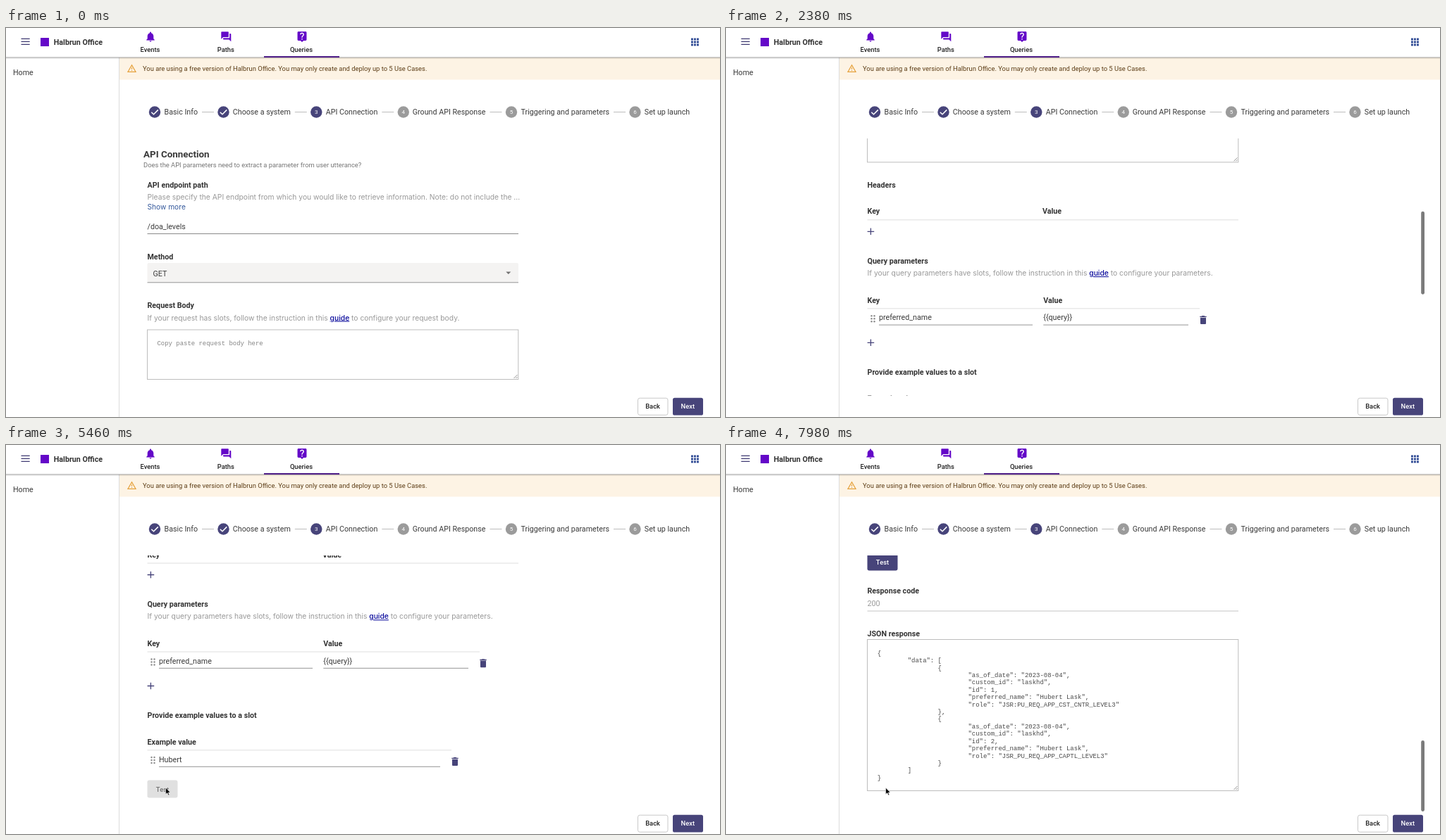
Write an HTML page that moves like this. It is 1013x553 px and loops after 8000 ms.

```html
<!DOCTYPE html>
<html lang="en">
<head>
<meta charset="utf-8">
<title>API Connection</title>
<style>
html, body { margin: 0; width: 100%; height: 100%; overflow: hidden; background: #fff; }
svg { display: block; width: 1013px; height: 553px; }
text { font: 10.7px Roboto, sans-serif; fill: #3a3a3a; white-space: pre; }
.head { font-size: 13.4px; font-weight: 700; fill: #3a3a3a; }
.bold { font-weight: 700; fill: #333; }
.small { font-size: 9.37px; fill: #757575; }
.tab { font-size: 9.37px; font-weight: 500; text-anchor: middle; fill: #222; }
.num { font-size: 8px; fill: #fff; text-anchor: middle; }
.banner { font-size: 9.37px; fill: #5c3d16; }
.desc { font: 10.3px Inter, sans-serif; fill: #999; }
.more { font: 10.2px Inter, sans-serif; fill: #35599c; }
.link { fill: #0a0a9c; font-weight: 500; text-decoration: underline; }
.mono { font: 8.95px "Liberation Mono", monospace; fill: #4a4a4a; }
.hint { fill: #858585; }
.value { fill: #999; }
</style>
</head>
<body>
<svg id="stage" viewBox="0 0 1013 553"></svg>
<script>
const INK = '#47447a', PURPLE = '#6408c8', GRAY = '#9b9b9b';
const ICONS = {
  bell: 'M18 11c0-3.07-1.64-5.64-4.5-6.32V4c0-.83-.67-1.5-1.5-1.5s-1.5.67-1.5 1.5v.68C7.63 5.36 6 7.92 6 11v5l-2 2v1h16v-1l-2-2v-5zm-6 11c1.1 0 2-.9 2-2h-4c0 1.1.9 2 2 2z',
  chat: 'M21 6h-2v9H6v2c0 .55.45 1 1 1h11l4 4V7c0-.55-.45-1-1-1zm-4 6V3c0-.55-.45-1-1-1H3c-.55 0-1 .45-1 1v14l4-4h10c.55 0 1-.45 1-1z',
  help: 'M19 2H5c-1.11 0-2 .9-2 2v14c0 1.1.89 2 2 2h4l3 3 3-3h4c1.1 0 2-.9 2-2V4c0-1.1-.9-2-2-2zm-6 16h-2v-2h2v2zm2.07-7.75-.9.92C13.45 11.9 13 12.5 13 14h-2v-.5c0-1.1.45-2.1 1.17-2.83l1.24-1.26c.37-.36.59-.86.59-1.41 0-1.1-.9-2-2-2s-2 .9-2 2H8c0-2.21 1.79-4 4-4s4 1.79 4 4c0 .88-.36 1.68-.93 2.25z',
  trash: 'M6 19c0 1.1.9 2 2 2h8c1.1 0 2-.9 2-2V7H6v12zM19 4h-3.5l-1-1h-5l-1 1H5v2h14V4z',
  warn: 'M12 5.99 19.53 19H4.47L12 5.99M12 2 1 21h22L12 2zm1 14h-2v2h2v-2zm0-6h-2v4h2v-4z'
};

const text = (x, y, str, cls = '') => `<text x="${x}" y="${y}" class="${cls}">${str}</text>`;
const rect = (x, y, w, h, attrs) => `<rect x="${x}" y="${y}" width="${w}" height="${h}" ${attrs}/>`;
const path = (d, color, width = 1, extra = '') =>
  `<path d="${d}" fill="none" stroke="${color}" stroke-width="${width}" ${extra}/>`;
const line = (x1, x2, y, color = '#949494', extra = '') => path(`M${x1} ${y}H${x2}`, color, 1, extra);
const icon = (name, cx, cy, k, color) =>
  `<path d="${ICONS[name]}" fill="${color}" transform="translate(${cx - 12 * k} ${cy - 12 * k}) scale(${k})"/>`;
const plus = y => path(`M200.6 ${y}h9.6m-4.8-4.8v9.6`, INK, 1.3);
const trash = (x, y) => icon('trash', x, y, .669, INK);
const grip = y => [-4, 0, 4].map(d => [206.5, 210.5].map(x =>
  `<circle cx="${x}" cy="${y + d}" r="1.2" fill="#8c8c8c"/>`).join('')).join('');
const area = (y, h) => rect(200.5, y, 526.3, h, 'fill="#fff" stroke="#bdbdbd"') +
  path(`M720.5 ${y + h - 1.5}l5-5m-2 5l2-2`, '#777', .8);
const guide = (y, before, after) =>
  text(200.5, y, `${before} <tspan class="link">guide</tspan> ${after}`, 'desc');

function step([cx, label, x], i) {
  const mark = i < 2
    ? path(`M${cx - 4.7} 119.7l3.2 3.1 6.3-6.4`, '#fff', 1.5)
    : text(cx, 122.4, i + 1, 'num');
  return `<circle cx="${cx}" cy="119.5" r="8.2" fill="${i < 3 ? INK : GRAY}"/>` + mark +
    text(x, 123.3, label) + (i ? line(cx - 30.5, cx - 13.5, 119.5, '#bdbdbd') : '');
}

const record = (id, role) =>
  `\t\t{\n\t\t\t"as_of_date": "2023-08-04",\n\t\t\t"custom_id": "laskhd",\n\t\t\t"id": ${id},\n` +
  `\t\t\t"preferred_name": "Hubert Lask",\n\t\t\t"role": "${role}"\n\t\t}`;
const json = `{\n\t"data": [\n${record(1, 'JSR:PU_REQ_APP_CST_CNTR_LEVEL3')},\n` +
  `${record(2, 'JSR_PU_REQ_APP_CAPTL_LEVEL3')}\n\t]\n}`;
const jsonLines = json.split('\n').map((row, i) => {
  const tabs = row.lastIndexOf('\t') + 1;
  return text(214.8 + tabs * 42.9, 1035.3 + i * 10.41, row.slice(tabs), 'mono');
}).join('');

const form = [
  text(195, 184.2, 'API Connection', 'head'),
  text(195, 198, 'Does the API parameters need to extract a parameter from user utterance?', 'small'),
  text(200.5, 227, 'API endpoint path', 'bold'),
  text(200.5, 244.2, 'Please specify the API endpoint from which you would like to retrieve information. Note: do not include the ...', 'desc'),
  text(200.5, 258, 'Show more', 'more'),
  text(200.5, 285.8, '/doa_levels'),
  line(200.5, 727, 292.5, '#8a8a8a'),
  text(200.5, 329, 'Method', 'bold'),
  rect(200.5, 334, 526.5, 28, 'rx="2" fill="#f4f3f2"'),
  line(200.5, 727, 361.8, '#949494'),
  text(208.5, 353.4, 'GET'),
  '<path d="M709.3 346.5h7l-3.5 3.5z" fill="#707070"/>',
  text(200.5, 398, 'Request Body', 'bold'),
  guide(415.5, 'If your request has slots, follow the instruction in this', 'to configure your request body.'),
  area(429, 70.5),
  text(214.5, 451, 'Copy paste request body here', 'mono hint'),

  text(200.5, 535.5, 'Headers', 'bold'),
  text(200.5, 573, 'Key', 'bold'), text(449, 573, 'Value', 'bold'),
  line(200.5, 727, 581.5, '#dedede'),
  plus(598),
  text(200.5, 643.5, 'Query parameters', 'bold'),
  guide(660.8, 'If your query parameters have slots, follow the instruction in this', 'to configure your parameters.'),
  text(200.5, 699.3, 'Key', 'bold'), text(450.3, 699.3, 'Value', 'bold'),
  line(200.5, 672, 707.5, '#dedede'),
  grip(722), text(217, 724.2, 'preferred_name'), text(450.3, 724.2, '{{query}}'),
  line(217, 435, 730.8), line(450.3, 656, 730.8), trash(677, 723.7),
  plus(756),

  text(200.5, 801.5, 'Provide example values to a slot', 'bold'),
  text(200.5, 839, 'Example value', 'bold'),
  line(200.5, 632, 847.3, '#dedede'),
  grip(861.5), text(217, 864, 'Hubert'),
  line(217, 616, 870.8), trash(637, 863.5),
  rect(200.5, 890, 43, 25, 'rx="2.7" id="test"'),
  '<text x="222" y="906" class="tab" id="testLabel">Test</text>',
  text(200.5, 947, 'Response code', 'bold'),
  text(200.5, 965.4, '200', 'value'),
  line(200.5, 727, 972.5, '#c4c4c4'),
  text(200.5, 1008.5, 'JSON response', 'bold'),
  area(1013, 215), jsonLines
].join('');

const apps = [972, 976, 980].map(x => [14.5, 18.5, 22.5].map(y =>
  rect(x, y, 2.9, 2.9, 'fill="#2f4a94"')).join('')).join('');

document.getElementById('stage').innerHTML = `
<defs>
  <clipPath id="view"><rect x="190" y="157" width="800" height="365.5"/></clipPath>
  <filter id="shade" x="-20%" y="-20%" width="140%" height="160%">
    <feDropShadow dx="0" dy="1.6" stdDeviation="1.4" flood-opacity=".38"/></filter>
  <linearGradient id="fall" x2="0" y2="1"><stop stop-opacity=".34"/><stop offset="1" stop-opacity="0"/></linearGradient>
</defs>` + [
  rect(0, 0, 1013, 553, 'fill="#fff"'),
  path('M160.5 42V553', '#dcdcdc'),
  rect(161, 42, 852, 31.5, 'fill="#fdf3e4"'),
  rect(0, 41, 1013, 3.2, 'fill="url(#fall)"'),
  rect(0, 0, 1013, 41.2, 'fill="#fff"'),
  path('M21.5 15.4h12.2m-12.2 4h12.2m-12.2 4h12.2', '#3f3a72', 1.4),
  rect(49, 14, 12, 12, `fill="${PURPLE}"`),
  text(67.8, 23.7, 'Halbrun Office', 'bold'),
  icon('bell', 205, 12.4, .72, PURPLE), text(204.5, 33.8, 'Events', 'tab'),
  icon('chat', 312.3, 12.2, .7, PURPLE), text(311.8, 33.8, 'Paths', 'tab'),
  icon('help', 420, 12.2, .72, PURPLE), text(419, 33.8, 'Queries', 'tab'),
  rect(366, 40, 107, 2, 'fill="#4d1c86"'),
  apps,
  text(10, 66.7, 'Home'),
  icon('warn', 178.5, 57.5, .6, '#e6a23c'),
  text(194, 61.2, 'You are using a free version of Halbrun Office. You may only create and deploy up to 5 Use Cases.', 'banner'),
  [[211, 'Basic Info', 224.6], [308.5, 'Choose a system', 321.8], [440.3, 'API Connection', 453.8],
   [563.8, 'Ground API Response', 576.8], [717, 'Triggering and parameters', 730.6],
   [892.5, 'Set up launch', 905.8]].map(step).join(''),
  `<g clip-path="url(#view)"><g id="form">${form}</g></g>`,
  rect(986.2, 0, 4.8, 118, 'rx="2.4" fill="#7b7b7b" id="thumb"'),
  rect(896.5, 526.2, 42.5, 24, 'rx="2.7" fill="#fff" stroke="#c9c9c9"'),
  text(917.6, 541.4, 'Back', 'tab'),
  rect(946, 525.8, 43, 24.8, `rx="2.7" fill="${INK}"`),
  '<text x="967.3" y="541.4" class="tab" style="fill:#fff">Next</text>',
  `<g id="cursor" stroke-linejoin="round">
    <path id="arrow" d="M0 0V9.4L2.2 7.4 3.7 10.7 5.1 10.1 3.7 6.9H6.6Z" stroke="#fff" stroke-width=".6"/>
    <path id="hand" d="M-.9 5.7V1a.9.9 0 0 1 1.8 0V4.2l3.4.7q1.2.3 1 1.5L4.6 10.8H-.2L-3.3 7q.6-1.5 2.4 0Z" fill="#fff" stroke="#222" stroke-width=".9"/>
  </g>`
].join('');

const $ = id => document.getElementById(id);
const clamp = v => Math.max(0, Math.min(1, v));
const mix = (a, b, u) => a + (b - a) * u;
const out = u => 1 - (1 - u) ** 2;
const smooth = u => u * u * (3 - 2 * u);

// start, end, scroll position reached, easing
const scrolls = [
  [1190, 1540, 236, out], [1820, 1960, 241.3, out], [2100, 2450, 311.5, out],
  [2520, 3150, 413.5, out], [6985, 7980, 736.5, smooth]
];
const scrollAt = t => scrolls.reduce((s, [a, b, to, ease]) =>
  mix(s, to, ease(clamp((t - a) / (b - a)))), 0);
const blend = (a, b, u) => `rgb(${a.map((v, i) => Math.round(mix(v, b[i], u)))})`;
const REST = [71, 68, 122], HOVER = [31, 61, 113], OFF = [224, 224, 224];

function draw(t) {
  const s = scrollAt(t), loaded = t >= 6790;
  $('form').setAttribute('transform', `translate(0 ${-s})`);

  const bar = loaded ? clamp((t - 6930) / 140) : t < 1260 ? 0 : 1 - clamp((t - 3430) / 280);
  $('thumb').setAttribute('y', loaded ? 348 + .283 * (s - 482) : 158.5 + .331 * s);
  $('thumb').setAttribute('height', loaded ? 101 : 118);
  $('thumb').setAttribute('opacity', bar);

  const off = t >= 4340 && !loaded;
  const hover = !off && t >= 4130 && t < 7630;
  const fill = off ? blend(HOVER, OFF, clamp((t - 4270) / 140))
    : !hover ? INK
    : loaded ? blend(OFF, HOVER, clamp((t - 6720) / 280))
    : blend(REST, HOVER, clamp((t - 4060) / 210));
  $('test').setAttribute('fill', fill);
  $('test').setAttribute('filter', hover ? 'url(#shade)' : 'none');
  $('testLabel').style.fill = off ? '#707070' : '#fff';

  const u = smooth(clamp((t - 3500) / 700));
  const x = mix(470, 226.6, u), y = mix(273, 487.2, u);
  const shown = (t >= 3500 && t < 4410) || t >= 5460;
  const pointing = hover && (loaded || y > 476);
  $('cursor').setAttribute('transform', `translate(${x} ${y})`);
  $('cursor').setAttribute('visibility', shown ? 'visible' : 'hidden');
  $('arrow').setAttribute('opacity', pointing ? 0 : 1);
  $('hand').setAttribute('opacity', pointing ? 1 : 0);
}

// The picture advances in 70 ms steps.
const start = performance.now();
function tick() {
  const t = (performance.now() - start) % 8000;
  draw(Math.floor(t / 70) * 70);
  requestAnimationFrame(tick);
}
tick();
</script>
</body>
</html>
```
